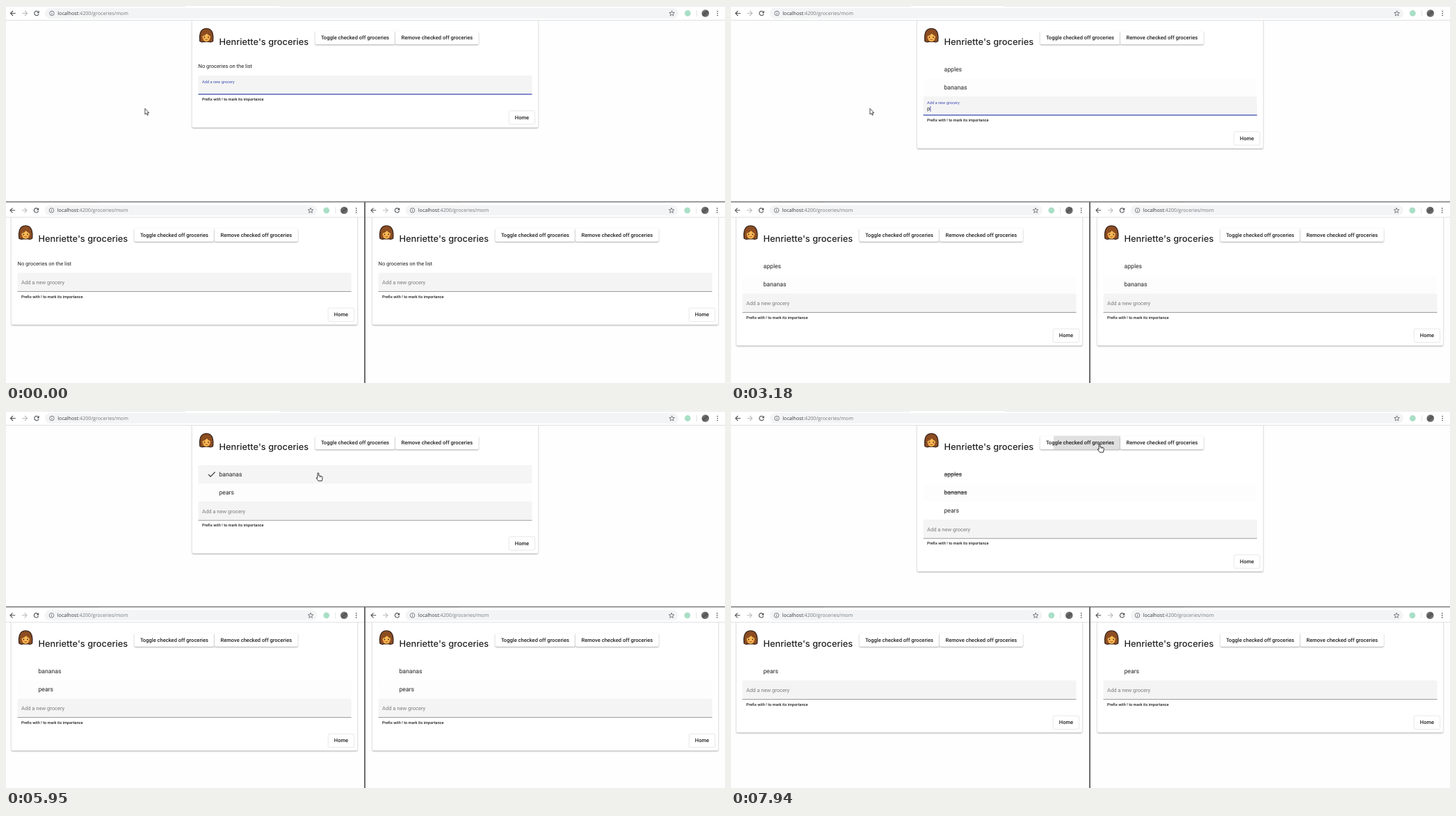
These frames come from a looping animation (1034 px wide and 542 px high, 7.99 s). An HTML page with a canvas:

```html
<!DOCTYPE html>
<html lang="en">
<head>
<meta charset="utf-8">
<title>Shared grocery list</title>
<style>
html, body { margin: 0; width: 100%; height: 100%; overflow: hidden; background: #fefefe; }
canvas { display: block; }
</style>
</head>
<body>
<canvas id="stage" width="1034" height="542"></canvas>
<script>
const ctx = document.getElementById('stage').getContext('2d');
const LOOP = 7990, LIST_TOP = 78, ROW = 26, LEFT = 276.5, RIGHT = 756.5;
const INK = 'rgba(0,0,0,.87)', BLUE = '#3f51b5';
const ROBOTO = 'Roboto, sans-serif';

// Times are [top window, other windows]
const ITEMS = [
  { name: 'apples', add: [1500, 1580], done: [5750, 5800] },
  { name: 'bananas', add: [2890, 2890], done: [6190, 6250] },
  { name: 'pears', add: [4090, 4090], done: [Infinity, Infinity] }
];
const TYPING = [
  [0, ''], [660, 'a'], [760, 'ap'], [920, 'app'], [1020, 'apple'], [1320, 'apples'], [1500, ''],
  [1770, 'b'], [2030, 'ba'], [2100, 'ban'], [2190, 'bana'], [2290, 'banan'], [2390, 'banana'],
  [2730, 'bananas'], [2890, ''], [3180, 'p'], [3390, 'pea'], [3630, 'pear'], [3880, 'pears'], [4090, '']
];
const CARET_ON = [[20, 510], [660, 4600], [5100, 5580]];
const POINTER = [
  [0, 199.5, 147], [4870, 199.5, 147], [5140, 450, 66], [5250, 450, 66], [5430, 440.5, 85],
  [5680, 440.5, 85], [6000, 449.5, 89], [6730, 449.5, 89], [7080, 606, 62], [7440, 530, 47.5]
];
const BLUR = 5583, SHOW_DONE = 7830;
const ROW_CLICKS = [[5588, 5750], [6140, 6190]];
const BUTTON_CLICK = 7752;

const clamp = v => Math.max(0, Math.min(1, v));
const mix = (a, b, k) => a + (b - a) * k;

function bezier(x1, y1, x2, y2) {
  const at = (a, b, s) => 3 * a * s * (1 - s) ** 2 + 3 * b * s * s * (1 - s) + s ** 3;
  return x => {
    let lo = 0, hi = 1;
    for (let i = 0; i < 24; i++) {
      const mid = (lo + hi) / 2;
      if (at(x1, x2, mid) < x) lo = mid; else hi = mid;
    }
    return at(y1, y2, lo);
  };
}
const rippleEase = bezier(0, 0, .2, 1);
const labelEase = bezier(.25, .8, .25, 1);

function text(str, x, y, size, { color = INK, weight = 400, family = ROBOTO, align = 'left' } = {}) {
  ctx.font = `${weight} ${size}px ${family}`;
  ctx.fillStyle = color;
  ctx.textAlign = align;
  ctx.fillText(str, x, y);
  return ctx.measureText(str).width;
}

function rect(x, y, w, h, color) {
  ctx.fillStyle = color;
  ctx.fillRect(x, y, w, h);
}

function box(x, y, w, h, r, color) {
  ctx.beginPath();
  ctx.roundRect(x, y, w, h, r);
  ctx.fillStyle = color;
  ctx.fill();
}

function disc(x, y, r, color) {
  ctx.beginPath();
  ctx.arc(x, y, r, 0, Math.PI * 2);
  ctx.fillStyle = color;
  ctx.fill();
}

function stroke(path, color, width) {
  ctx.strokeStyle = color;
  ctx.lineWidth = width;
  ctx.stroke(new Path2D(path));
}

function shape(path, fill, line, width) {
  ctx.fillStyle = fill;
  ctx.fill(new Path2D(path));
  if (line) stroke(path, line, width);
}

function raised(x, y, w, h, r) {
  ctx.save();
  ctx.shadowColor = 'rgba(0,0,0,.34)';
  ctx.shadowBlur = 2;
  ctx.shadowOffsetY = 1;
  box(x, y, w, h, r, '#fff');
  ctx.restore();
}

function ripple(x, y, age, reach, area) {
  ctx.save();
  ctx.beginPath();
  ctx.rect(...area);
  ctx.clip();
  disc(x, y, reach * rippleEase(clamp(age / 450)), 'rgba(0,0,0,.12)');
  ctx.restore();
}

function pointerAt(t) {
  for (let i = 1; i < POINTER.length; i++) {
    const [t0, x0, y0] = POINTER[i - 1], [t1, x1, y1] = POINTER[i];
    if (t < t1) {
      const k = clamp((t - t0) / (t1 - t0)), e = k * k * (3 - 2 * k);
      return { x: mix(x0, x1, e), y: mix(y0, y1, e) };
    }
  }
  const [, x, y] = POINTER[POINTER.length - 1];
  return { x, y };
}

function face() {
  ctx.lineJoin = 'round';
  shape('M278.8 50.5C278 44 278 32.4 288.2 32.4S298.4 44 297.6 50.5Q295 52.6 292 51.4H284.4Q281.4 52.6 278.8 50.5Z',
    '#8c4d22', '#3a251b', 1.3);
  shape('M282.2 43C282.2 38 294.2 38 294.2 43C294.4 48.5 291.5 51.4 288.2 51.4S282 48.5 282.2 43Z', '#fbb953', '#5b3518', .5);
  shape('M281.6 43.6C281.8 37.5 285 36 288.2 36S294.7 37.5 294.8 43.6C292.5 43 290 41.5 288.8 39.3C287 41.8 284.5 43.2 281.6 43.6Z', '#8c4d22');
  for (const side of [-1, 1]) {
    disc(288.2 + side * 2.8, 44.8, .9, '#35241c');
    disc(288.2 + side * 4.2, 47.1, 1, '#f4863f');
  }
  stroke('M286.4 47.8Q288.2 49.6 290 47.8', '#713116', .8);
}

function toolbar(x0, x1, y, dl, dr) {
  ctx.save();
  ctx.translate(0, y);
  rect(x0, 0, x1 - x0, 20, '#fff');
  rect(x0, 20, x1 - x0, 1, '#dfe0e2');
  box(56 + dl, 3, 911 + dr - dl, 15, 7.5, '#f3f4f5');

  ctx.save();
  ctx.translate(dl, 0);
  stroke('M13.7 10.5H6.6M10 7L6.5 10.5L10 14', '#4d5054', 1.1);
  stroke('M23.3 10.5H30.4M27 7L30.5 10.5L27 14', '#b9bbbe', 1.1);
  stroke('M46.6 8.6A3.2 3.2 0 1 0 47.1 11.4', '#4d5054', 1.1);
  shape('M47.7 6.8V10.2H44.3Z', '#4d5054');
  stroke('M62.7 10.5A3.3 3.3 0 1 0 69.3 10.5A3.3 3.3 0 1 0 62.7 10.5M66 10V12.4M66 8.4V9.2', '#5f6368', .8);
  const url = { family: '"Open Sans", sans-serif', color: '#33363a' };
  const w = text('localhost', 74.3, 13.1, 7.15, url);
  text(':4200/groceries/mom', 74.3 + w, 13.1, 7.15, { ...url, color: '#75787c' });
  ctx.restore();

  ctx.save();
  ctx.translate(dr, 0);
  ctx.beginPath();
  for (let i = 0; i < 10; i++) {
    const a = i * Math.PI / 5 - Math.PI / 2, r = i % 2 ? 1.7 : 4;
    ctx.lineTo(957.6 + r * Math.cos(a), 10.8 + r * Math.sin(a));
  }
  ctx.closePath();
  ctx.strokeStyle = '#5f6368';
  ctx.lineWidth = .8;
  ctx.stroke();
  disc(980.3, 10.5, 4.4, '#a9dfc6');
  rect(993, 6, .7, 9, '#d5d7da');
  const tone = ctx.createLinearGradient(1001, 5, 1010, 16);
  tone.addColorStop(0, '#8b8b8b');
  tone.addColorStop(.5, '#555');
  tone.addColorStop(1, '#858585');
  disc(1005.8, 10.5, 5.3, tone);
  for (const d of [-3, 0, 3]) disc(1023.2, 10.5 + d, .85, '#4d5054');
  ctx.restore();
  ctx.restore();
}

function field(top, t, active) {
  box(LEFT, top, RIGHT - LEFT, 27.3, [2, 2, 0, 0], '#f4f4f4');
  const rest = active ? labelEase(clamp((t - BLUR) / 400)) : 1;
  const focused = active && t < BLUR;
  const c = [mix(63, 125, rest), mix(81, 125, rest), mix(181, 125, rest)].map(Math.round);
  text('Add a new grocery', 282, top + mix(10.9, 16.6, rest), mix(5.67, 7.56, rest), { color: `rgb(${c})` });
  if (focused) rect(LEFT, top + 26.2, RIGHT - LEFT, 1.3, BLUE);
  else rect(LEFT, top + 26.8, RIGHT - LEFT, .7, '#777');
  if (focused) {
    const typed = TYPING.filter(k => k[0] <= t).pop()[1];
    const w = text(typed, 282, top + 20.4, 7.56);
    if (CARET_ON.some(([on, off]) => t >= on && t < off)) rect(282.2 + w, top + 14, .8, 8, BLUE);
  }
  text('Prefix with ! to mark its importance', 282, top + 36.3, 5.67, { weight: 500 });
}

function list(items, t, hover) {
  items.forEach((item, i) => {
    const y = LIST_TOP + i * ROW, area = [LEFT, y, RIGHT - LEFT, ROW];
    if (i === 1) rect(...area, '#fdfdfd');
    if (hover && hover.row === i) {
      rect(...area, '#f5f5f5');
      for (const [from, to] of ROW_CLICKS) {
        if (t >= from && t < to) ripple(441, 91, t - from, 315, area);
      }
      stroke(`M291 ${y + 13.2}L294.2 ${y + 16.4}L300.6 ${y + 9.6}`, '#333', 1.2);
    }
    const w = text(item.name, 306.5, y + 15.5, 8.64);
    if (item.struck) rect(306.5, y + 12.5, w, .8, '#333');
  });
}

function pane(dx, dy, items, t, hover) {
  ctx.save();
  ctx.translate(dx, dy);
  const top = items.length ? LIST_TOP + ROW * items.length : 100;
  raised(267.7, 10, 497.6, top + 64.7, 2);
  face();
  text("Henriette's groceries", 306.5, 55.6, 12.8, { weight: 500, family: 'Inter, sans-serif' });

  raised(444.5, 35.7, 115, 19.6, 2);
  raised(559.8, 35.7, 120, 19.6, 2);
  if (hover && t >= BUTTON_CLICK) ripple(530, 47.5, t - BUTTON_CLICK, 86, [444.5, 35.7, 115, 19.6]);
  const label = { weight: 500, align: 'center' };
  text('Toggle checked off groceries', 502, 48.1, 7.56, label);
  text('Remove checked off groceries', 619.8, 48.1, 7.56, label);

  if (items.length) list(items, t, hover);
  else text('No groceries on the list', 276.5, 89.2, 7.56);
  field(top, t, !!hover);

  box(723.2, top + 50.7, 37.4, 19.4, 2, '#fff');
  ctx.strokeStyle = '#dedede';
  ctx.lineWidth = .7;
  ctx.stroke();
  text('Home', 742, top + 62.8, 7.56, label);
  ctx.restore();
}

function drawPointer({ x, y }, hand) {
  ctx.save();
  ctx.translate(x, y);
  ctx.lineJoin = 'round';
  if (hand) {
    shape('M-.9 .6Q0 -.4 .9 .6V4.3L2.4 4.5L4 4.9L5.6 5.5Q6.4 5.9 6.3 7L5.4 11.8H.3L-2.4 8.2Q-2.9 6.8 -1.9 6.9L-.9 7.8Z',
      '#fff', '#222', .9);
    stroke('M2.4 4.6V6.8M4.1 5V6.9', '#222', .6);
  } else {
    shape('M.4 .4V8.8L2.3 7.1L3.7 10.1L5 9.5L3.7 6.6H6.2Z', '#fff', '#222', .8);
  }
  ctx.restore();
}

function windowFrames() {
  toolbar(0, 1034, 0, 0, 0);
  toolbar(0, 515, 283.3, -.5, -519.5);
  toolbar(517, 1034, 283.3, 518.5, -.5);
  rect(0, 0, 258, .7, '#e4e6e9');
  rect(393, 0, 641, .7, '#e4e6e9');
  rect(0, 280.3, 1034, 1, '#d8d8d8');
  rect(0, 281.2, 1034, 1.1, '#5c5c5c');
  rect(134, 282.3, 381, .9, '#dfe1e5');
  rect(653, 282.3, 381, .9, '#dfe1e5');
  rect(515.2, 282, 1.6, 260, '#484848');
}

function itemsAt(t, who) {
  return ITEMS
    .filter(i => t >= i.add[who] && (t < i.done[who] || (who === 0 && t >= SHOW_DONE)))
    .map(i => ({ name: i.name, struck: t >= i.done[who] }));
}

function draw(t) {
  ctx.textRendering = 'geometricPrecision';
  rect(0, 0, 1034, 542, '#fefefe');
  const mine = itemsAt(t, 0), others = itemsAt(t, 1), p = pointerAt(t);
  const inList = p.x > LEFT && p.x < RIGHT && p.y >= LIST_TOP;
  const row = inList ? Math.floor((p.y - LIST_TOP) / ROW) : -1;
  const onRow = row >= 0 && row < mine.length;
  const onButton = p.x > 444.5 && p.x < 680 && p.y > 35.7 && p.y < 55.3;

  pane(0, 0, mine, t, { row });
  pane(-260, 283.5, others, t, null);
  pane(259, 283.5, others, t, null);
  windowFrames();
  drawPointer(p, onRow || onButton);
}

function tick(now) {
  draw(now % LOOP);
  requestAnimationFrame(tick);
}
requestAnimationFrame(tick);
</script>
</body>
</html>
```
